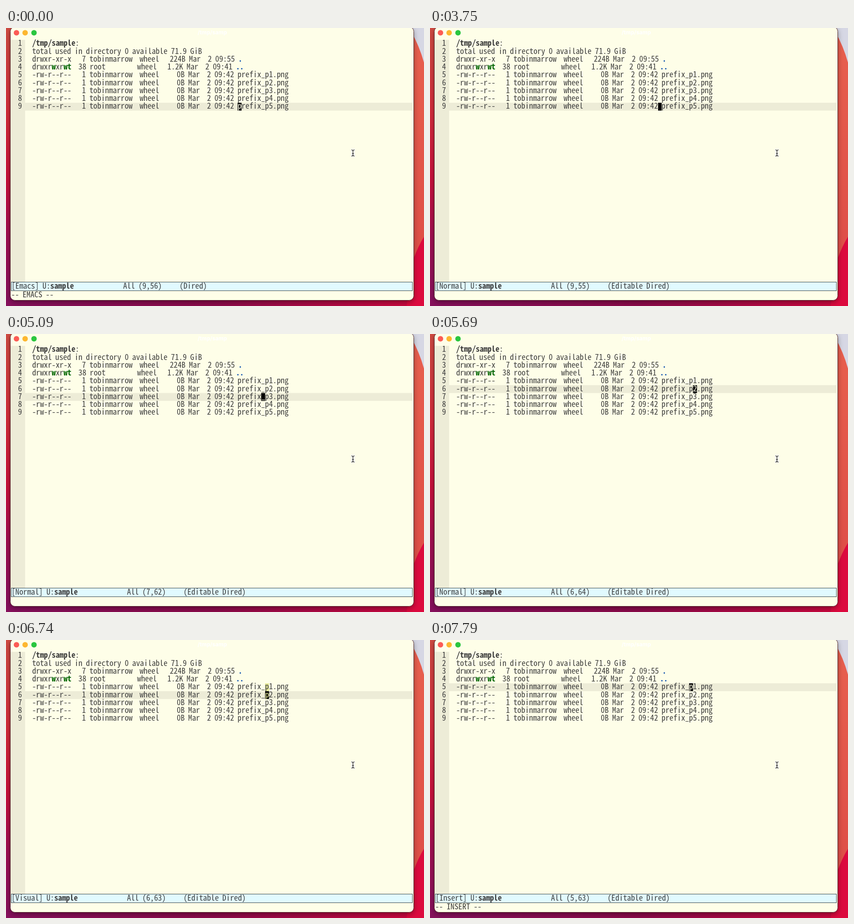
These frames come from a looping animation (918x610 px, 8 s). An HTML page:

```html
<!DOCTYPE html>
<html lang="en">
<head>
<meta charset="utf-8">
<title>Editable directory listing</title>
<style>
  html, body { margin: 0; width: 100%; height: 100%; overflow: hidden; background: #c3123f; }
  svg { display: block; width: 918px; height: 610px; }
  text { fill: #3d3d3d; white-space: pre; font-variant-numeric: slashed-zero; font-kerning: none; }
  .bold { font-weight: 700; }
  .write { fill: #006400; font-weight: 700; }
  .dir { fill: #1054af; font-weight: 700; }
  .key { fill: #00008b; font-weight: 700; }
  .title { font: 700 12px Inter, sans-serif; fill: #fff; word-spacing: 0; }
</style>
</head>
<body>
<svg id="stage" viewBox="0 0 918 610" xmlns="http://www.w3.org/2000/svg">
  <defs>
    <linearGradient id="left" x2="0" y2="1">
      <stop offset="0" stop-color="#cf4a42"/>
      <stop offset=".3" stop-color="#d42c3c"/>
      <stop offset=".55" stop-color="#c8103c"/>
      <stop offset=".75" stop-color="#a00f52"/>
      <stop offset="1" stop-color="#86105c"/>
    </linearGradient>
    <linearGradient id="bottom">
      <stop offset="0" stop-color="#86105c"/>
      <stop offset=".5" stop-color="#8c0a4a"/>
      <stop offset="1" stop-color="#d0083e"/>
    </linearGradient>
    <linearGradient id="right" x2="0" y2="1">
      <stop offset="0" stop-color="#e8604e"/>
      <stop offset="1" stop-color="#dc4a46"/>
    </linearGradient>
    <filter id="shadow" x="-5%" y="-5%" width="110%" height="112%">
      <feDropShadow dx="0" dy="4" stdDeviation="6" flood-opacity=".35"/>
    </filter>
  </defs>

  <rect width="12" height="610" fill="url(#left)"/>
  <rect y="590" width="918" height="20" fill="url(#bottom)"/>
  <rect x="890" width="28" height="610" fill="url(#right)"/>
  <path d="M890 0H918V76Q908 40 890 8Z" fill="#d6d7e4"/>
  <path d="M890 520Q904 480 918 458V610H880Z" fill="#dc0a3e"/>

  <rect x="9.5" y="-2.5" width="886" height="600" rx="10" fill="#fefee8" stroke="#4a2028" filter="url(#shadow)"/>
  <circle cx="23" cy="10.5" r="6" fill="#fc5b55"/>
  <circle cx="42" cy="10.5" r="6" fill="#fdb72f"/>
  <circle cx="61.5" cy="10.5" r="6" fill="#2ac63f"/>
  <text class="title" x="453" y="14" text-anchor="middle">/tmp/samp</text>

  <rect x="10" y="26" width="32" height="531" fill="#edecd7"/>
  <rect id="highlight" x="42" width="851" height="17.25" fill="#edecd7"/>
  <rect id="region" fill="#e8eb98"/>
  <g id="listing"></g>
  <rect id="cursor" height="17.25"/>
  <text id="under"></text>

  <rect x="11.5" y="557.5" width="881" height="19" fill="#e1faff" stroke="#35424a"/>
  <text x="12" y="571.7"><tspan id="mode"></tspan><tspan class="bold">sample</tspan><tspan id="position"></tspan></text>
  <text id="echo" x="11.5" y="591"></text>
  <g id="hint"></g>

  <g fill="none" stroke-linecap="square">
    <path id="beam" d="M759 267.5Q762 267.5 762 270V278.5Q762 281 759 281M765 267.5Q762 267.5 762 270M765 281Q762 281 762 278.5M760.5 275.5H763.5" stroke="#fff" stroke-width="2.6"/>
    <use href="#beam"/>
    <path d="M759 267.5Q762 267.5 762 270V278.5Q762 281 759 281M765 267.5Q762 267.5 762 270M765 281Q762 281 762 278.5M760.5 275.5H763.5" stroke="#111" stroke-width="1.2"/>
  </g>
</svg>
<script>
const LOOP = 8000, CHAR = 8.62, SPACE = 7.73, ROW = 17.25, TOP = 26, LEFT = 42;
const FAMILY = '"Noto Sans Mono CJK SC", "Noto Sans Mono CJK JP", "Noto Sans Mono", monospace';
const $ = id => document.getElementById(id);

// Spaces are narrower than the other characters.
const widthOf = s => [...s].reduce((sum, c) => sum + (c === ' ' ? SPACE : CHAR), 0);
const rowTop = row => TOP + (row - 1) * ROW;
const baseline = row => rowTop(row) + 13.4;
const span = (cls, s) => `<tspan class="${cls}">${s}</tspan>`;
const textAt = (x, y, s) => `<text x="${x}" y="${y}">${s}</text>`;
const setAttrs = (el, attrs) => {
  for (const name in attrs) el.setAttribute(name, attrs[name]);
};

// Choose the size at which the font's advance equals one cell.
const pen = document.createElement('canvas').getContext('2d');
pen.font = `100px ${FAMILY}`;
Object.assign($('stage').style, {
  fontFamily: FAMILY,
  fontSize: 100 * CHAR / pen.measureText('M').width + 'px',
  wordSpacing: SPACE - CHAR + 'px'
});

const fileRow = n => `  -rw-r--r--   1 tobinmarrow  wheel     0B Mar  2 09:42 prefix_p${n}.png`;
const rows = [
  '  ' + span('bold', '/tmp/sample') + ':',
  '  total used in directory 0 available 71.9 GiB',
  '  drwxr-xr-x   7 tobinmarrow  wheel   224B Mar  2 09:55 ' + span('dir', '.'),
  `  drwxr${span('write', 'w')}xr${span('write', 'wt')}  38 root         wheel   1.2K Mar  2 09:41 ` + span('dir', '..'),
  ...[1, 2, 3, 4, 5].map(fileRow)
];
$('listing').innerHTML = rows.map((s, i) =>
  textAt(26.4, baseline(i + 1), i + 1) + textAt(LEFT, baseline(i + 1), s)).join('');

function buildHint() {
  let x = 11, out = '';
  const parts = ['Press ', 'C-c C-c', ' when finished or ', 'C-c ESC', ' to abort changes'];
  parts.forEach((s, i) => {
    const w = widthOf(s);
    if (i % 2) {
      out += `<rect x="${x + .5}" y="577.5" width="${w + 1}" height="17" fill="#f4f4ee" stroke="#d6d6d0"/>`
        + textAt(x + 1, 591, span('key', s));
      x += 2;
    } else {
      out += textAt(x, 591, s);
    }
    x += w;
  });
  $('hint').innerHTML = out;
}
buildHint();

// Each step lists only what changes.
const steps = [
  { at: 0, mode: 'Emacs', row: 9, col: 56, echo: '-- EMACS --' },
  { at: 750, echo: '' },
  { at: 900, mode: 'Insert', hint: true },
  { at: 3750, mode: 'Normal', col: 55, hint: false },
  { at: 4200, col: 61 },
  { at: 4500, col: 62 },
  { at: 4790, row: 8 },
  { at: 5090, row: 7 },
  { at: 5390, row: 6 },
  { at: 5540, col: 63 },
  { at: 5690, col: 64 },
  { at: 6140, row: 5 },
  { at: 6290, col: 63 },
  { at: 6590, mode: 'Visual', echo: '-- VISUAL BLOCK --' },
  { at: 6740, row: 6, echo: '' },
  { at: 7040, row: 7 },
  { at: 7190, row: 8 },
  { at: 7340, row: 9 },
  { at: 7790, mode: 'Insert', row: 5, echo: '-- INSERT --' }
];

function show({ mode, row, col, echo, hint }) {
  const line = rows[row - 1], char = line[col];
  const x = LEFT + widthOf(line.slice(0, col));
  const visual = mode === 'Visual';
  setAttrs($('highlight'), { y: rowTop(row) });
  setAttrs($('cursor'), { x, y: rowTop(row), width: widthOf(char) });
  setAttrs($('under'), { x, y: baseline(row), style: `fill: ${visual ? '#e8eb98' : '#fefee8'}` });
  setAttrs($('region'), { x, y: rowTop(5), width: CHAR, height: visual ? (row - 5) * ROW : 0 });
  $('under').textContent = char;
  $('mode').textContent = `[${mode}] U:`;
  $('position').textContent = `${' '.repeat(14)}All (${row},${col})     (${mode === 'Emacs' ? '' : 'Editable '}Dired)`;
  $('echo').textContent = echo;
  $('hint').style.display = hint ? '' : 'none';
}

let shown = 0;
function tick() {
  const t = performance.now() % LOOP;
  const past = steps.filter(step => step.at <= t);
  if (past.length !== shown) {
    shown = past.length;
    show(Object.assign({}, ...past));
  }
  requestAnimationFrame(tick);
}
tick();
</script>
</body>
</html>
```
